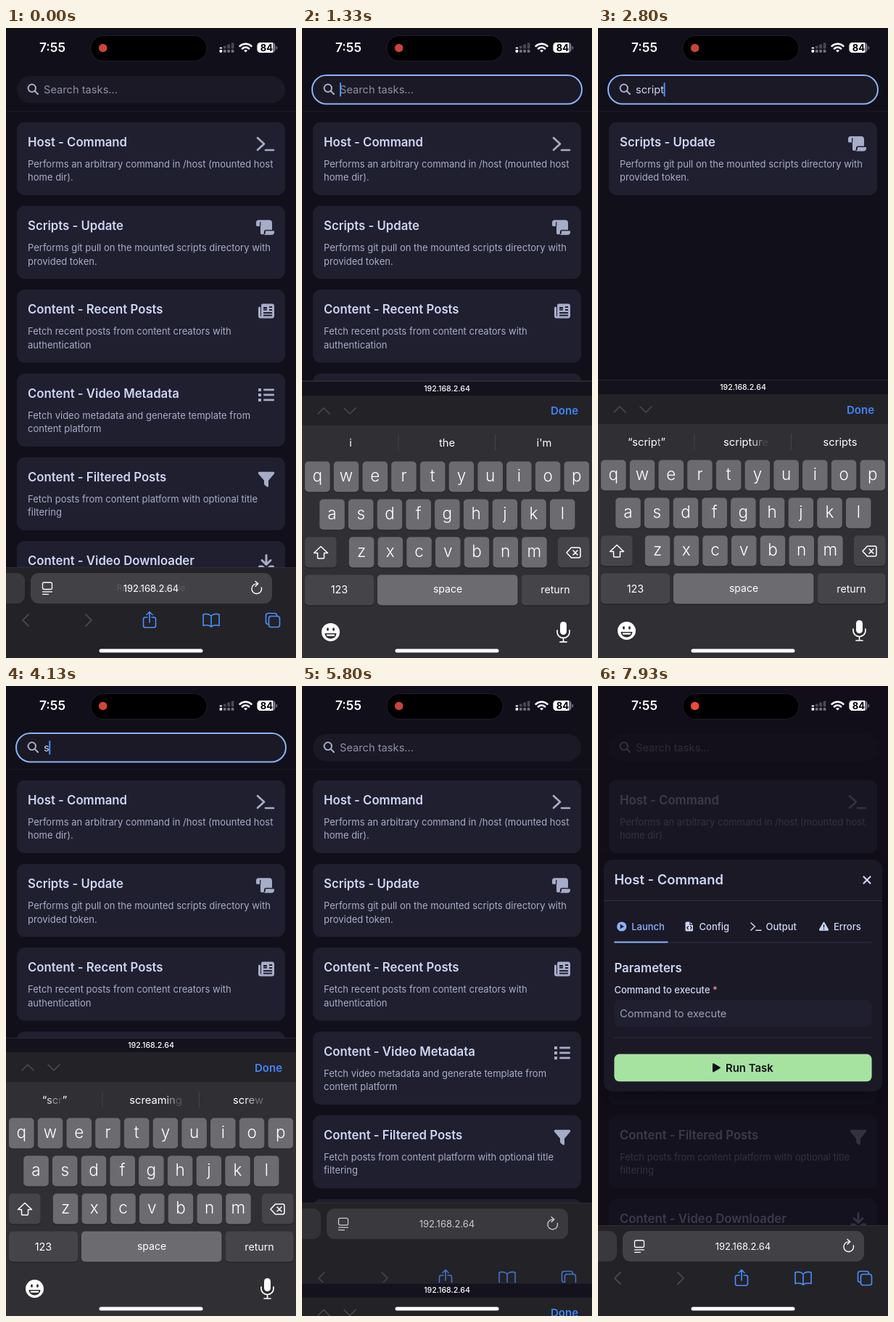
An HTML page for the animation above (8 s loop, 400 by 867 pixels).

```html
<!DOCTYPE html>
<html lang="en">
<head>
<meta charset="utf-8">
<title>Task search</title>
<style>
  html, body { margin: 0; width: 100%; height: 100%; overflow: hidden; background: #110f1a; }
  svg { display: block; width: 100vw; height: 100vh; font-family: Inter, "Noto Sans", sans-serif; }
  text { white-space: pre; }
  .line { fill: none; stroke: currentColor; stroke-linecap: round; stroke-linejoin: round; }
  .solid { fill: currentColor; }
  #modal { filter: drop-shadow(0 14px 12px rgba(0, 0, 0, .32)); }
</style>
</head>
<body>
<svg id="stage" viewBox="0 0 400 867"></svg>
<script>
const LOOP = 8000;
const BLUE = '#4a90fb', ACCENT = '#89b4fa', TEXT = '#cdd6f4', MUTED = '#a6adc8', PAGE = '#110f1a', CARD = '#201f2f';

const label = (x, y, size, fill, content, extra = '') =>
  `<text x="${x}" y="${y}" font-size="${size}" fill="${fill}" ${extra}>${content}</text>`;
const rect = (x, y, w, h, r, fill, extra = '') =>
  `<rect x="${x}" y="${y}" width="${w}" height="${h}" rx="${r}" fill="${fill}" ${extra}/>`;
const line = (d, width = 2, extra = '') => `<path class="line" stroke-width="${width}" d="${d}" ${extra}/>`;
const solid = d => `<path class="solid" d="${d}"/>`;
const group = (x, y, color, content, extra = '') =>
  `<g transform="translate(${x} ${y})" color="${color}" ${extra}>${content}</g>`;
const MIDDLE = 'text-anchor="middle"', BOLD = 'font-weight="600"', MEDIUM = 'font-weight="500"';

// Card icons share a 25 x 22 box.
const icons = {
  terminal: line('M2 3.2l9 8.3-9 8.3M13 20h11', 2.7),
  scroll: solid('M3.5 1H18a4 4 0 0 1 4 4v9.5H13.5a2.5 2.5 0 0 0-2.5 2.5v1.5a2.5 2.5 0 0 1-5 0V9.5H1.5A1.5 1.5 0 0 1 0 8V4.5A3.5 3.5 0 0 1 3.5 1z') +
    solid('M13 16h12v1.5a4 4 0 0 1-4 4H10.5c1.7-.8 2.5-2 2.5-3.5z') + line('M5.7 4v5', 1.3, `style="color:${CARD}"`),
  news: solid('M9 1h13a3 3 0 0 1 3 3v14a3 3 0 0 1-3 3H6a3 3 0 0 1-3-3V6.5a1.5 1.5 0 0 1 3 0V18h1V3a2 2 0 0 1 2-2z') +
    `<path fill="none" stroke="${CARD}" stroke-width="2" d="M10 6.5h5M10 9h5M18 5.5h4M18 9.5h4M10 13.5h12M10 17h12"/>`,
  list: solid('M3 2h4v4H3zM3 9h4v4H3zM3 16h4v4H3z') + line('M11.3 4h12.5M11.3 11h12.5M11.3 18h12.5', 2.6),
  filter: solid('M4 1.5h20q2 1 .7 3l-7.7 9v8q-.7 1.5-2 .7l-3.5-2.7q-.5-.6-.5-1.5v-4.5L3.300 4.500Q2 2.500 4 1.500z'),
  download: line('M14 1v12M8 8l6 6 6-6', 3) + solid('M5 15h4l5 4 5-4h4q2 0 2 2v3q0 2-2 2H5q-2 0-2-2v-3q0-2 2-2z')
};

const cards = [
  ['Host - Command', 'Performs an arbitrary command in /host (mounted host', 'home dir).', 'terminal'],
  ['Scripts - Update', 'Performs git pull on the mounted scripts directory with', 'provided token.', 'scroll'],
  ['Content - Recent Posts', 'Fetch recent posts from content creators with', 'authentication', 'news'],
  ['Content - Video Metadata', 'Fetch video metadata and generate template from', 'content platform', 'list'],
  ['Content - Filtered Posts', 'Fetch posts from content platform with optional title', 'filtering', 'filter'],
  ['Content - Video Downloader', '', '', 'download']
];
const cardTop = i => 129.5 + i * 115.3;
const card = ([title, first, second, icon], i) => group(0, cardTop(i), MUTED,
  rect(15, 0, 370, 100.5, 11, CARD) +
  (i ? '' : rect(15, 0, 370, 100.5, 11, '#35344a', 'id="hover"')) +
  label(30, 33.3, 16.75, TEXT, title, BOLD) +
  label(30, 62.3, 13.03, MUTED, first) + label(30, 80.8, 13.03, MUTED, second) +
  group(345, 18.5, MUTED, icons[icon]), 'class="card"');

const search = rect(15, 66, 370, 37.5, 18.7, '#1b1925') +
  rect(14, 65, 372, 39.5, 19.7, 'none', `id="ring" stroke="${ACCENT}" stroke-width="2"`) +
  group(37, 84, MUTED, '<circle class="line" cx="-1.2" cy="-1.2" r="5.2" stroke-width="2"/>' + line('M3 3l4 4', 2.2)) +
  label(52, 90, 14.66, '#8d90a8', 'Search tasks...', 'id="hint"') +
  label(52, 90, 14.66, TEXT, '', 'id="query"') +
  rect(0, 75, 2, 19.5, 1, BLUE, 'id="caret"') +
  rect(0, 114, 400, 1, 0, '#1a1924');

const tab = (x, color, name, icon) => group(x, 331, color, icon) + label(x + 13.5, 335.7, 13.03, color, name, MEDIUM);
const modal = rect(8, 239, 384, 319, 12, '#1b1926') +
  label(22.4, 273, 18.4, TEXT, 'Host - Command', BOLD) +
  group(371, 267, TEXT, line('M-4.5-4.5l9 9M4.5-4.5l-9 9', 2.2)) +
  rect(8, 295, 384, 1, 0, '#313143') +
  rect(22.4, 352.5, 355.2, 1, 0, '#313143') + rect(22.4, 351.5, 74, 2, 0, ACCENT) +
  tab(32.7, ACCENT, 'Launch', '<circle class="solid" r="6.6"/><path fill="#1b1926" d="M-2-3.3l5.2 3.3-5.2 3.3z"/>') +
  tab(126, TEXT, 'Config', solid('M-4-6.5h5l4 4v7.5q0 1.5-1.5 1.5h-7.5q-1.5 0-1.5-1.5v-10q0-1.5 1.5-1.5z') +
    '<path fill="none" stroke="#1b1926" stroke-width="1.2" d="M1-6.5v4h4M-1.3-.5l-2 2.3 2 2.3M1.3-.5l2 2.3-2 2.3"/>') +
  tab(218, TEXT, 'Output', line('M-7-5l5.5 5-5.5 5M0 5.3h7', 1.6)) +
  tab(311.5, TEXT, 'Errors', solid('M-1-5.5q1-1.3 2 0l5.5 9.5q.5 1.8-1.2 1.8h-10.6q-1.7 0-1.2-1.8z') +
    '<path stroke="#1b1926" stroke-width="1.5" d="M0-2.5v4M0 2.7v1.5"/>') +
  label(22.4, 394, 16.85, TEXT, 'Parameters', BOLD) +
  label(22.4, 423, 13.03, TEXT, 'Command to execute <tspan fill="#f38ba8">*</tspan>', MEDIUM) +
  rect(22.4, 431.7, 355.2, 37.3, 8, CARD) + label(30, 456, 14.66, '#9a9eb6', 'Command to execute') +
  rect(22.4, 483.5, 355.2, 1, 0, '#313143') +
  rect(22.4, 506.6, 355.2, 37.7, 7, '#a6e3a1') +
  group(163, 525.3, PAGE, solid('M-5-5q0-1.5 1.5-1l9 5.2q1 .8 0 1.6l-9 5.2q-1.5.5-1.5-1z')) +
  label(176, 530.7, 14.9, PAGE, 'Run Task', BOLD);

// The bar is tall enough to stay behind the keyboard while both rise.
const toolbar = '<g id="bar">' + rect(0, 742, 400, 385, 0, '#232227') + rect(0, 742, 400, .7, 0, '#34333a') +
  '<g class="controls">' + rect(-20, 750, 46, 42, 11, '#39383d') + rect(34, 750, 333, 42, 11, '#424146') +
  label(200, 775, 12, '#fff', 'Reader Available', MIDDLE + ' id="ghost"') +
  label(200, 775.5, 13, '#fff', '192.168.2.64', MIDDLE) +
  group(57, 771, '#fff', '<rect class="line" x="-6.5" y="-8" width="13" height="9.5" rx="2" stroke-width="1.3"/>' +
    line('M-6.5 4.800h13M-6.500 8.300h8', 1.3)) +
  group(346, 771, '#fff', line('M6.3-1a6.8 6.8 0 1 1-5.5-5M-2-9.5l3.8 3.3-3.8 3.5', 1.4)) + '</g></g>' +
  '<g class="controls">' +
  group(27, 815, '#47464b', line('M4-8l-8 8 8 8', 1.9)) + group(114, 815, '#47464b', line('M-4-8l8 8-8 8', 1.9)) +
  group(198, 815, BLUE, line('M-3-4h-3q-2.5 0-2.5 2.5v9q0 2.5 2.5 2.5h12q2.5 0 2.5-2.5v-9q0-2.5-2.5-2.5h-3M0 3v-14M-4-7.5l4-4 4 4', 1.6)) +
  group(283, 815, BLUE, line('M0-6q-4.5-4-11-2v15.5q6.5-2 11 1.5q4.5-3.5 11-1.5v-15.5q-6.5-2-11 2v15', 1.6)) +
  group(368, 815, BLUE, '<rect class="line" x="-5.5" y="-5.5" width="15" height="15" rx="3" stroke-width="1.6"/>' +
    line('M-5.5 5.5h-1q-3 0-3-3v-9q0-3 3-3h9q3 0 3 3v1', 1.6)) + '</g>';

// Keyboard
const PITCH = 39.72, KEY_W = 34.6, KEY_H = 42, KEY = '#6c6b70', DARK_KEY = '#454449';
const keys = {};
[['qwertyuiop', 4, 594.5], ['asdfghjkl', 24.2, 646.5], ['zxcvbnm', 64.8, 698.5]].forEach(([row, x, y]) =>
  [...row].forEach((letter, i) => keys[letter] = { x: x + i * PITCH, y }));
const keyRect = (x, y, w, fill, extra) => rect(x, y + 1, w, KEY_H, 5, '#1c1c1f') + rect(x, y, w, KEY_H, 5, fill, extra);
const letterKeys = Object.entries(keys).map(([letter, { x, y }]) => keyRect(x, y, KEY_W, KEY) +
  label(x + KEY_W / 2, y + 27.5, 22.5, '#fff', letter, MIDDLE + ' font-weight="300"')).join('');

const keyboard = rect(0, 484, 400, 21, 0, '#13121d') + rect(0, 484, 400, 1, 0, '#2a2935') +
  label(200, 498, 10.6, '#fff', '192.168.2.64', MIDDLE + ' ' + MEDIUM) +
  rect(0, 504, 400, 42, 0, '#232227') + rect(0, 545, 400, 330, 0, '#302f34') +
  group(30, 525, '#4b4a50', line('M-8 4l8-8 8 8', 1.6)) + group(66, 525, '#4b4a50', line('M-8-4l8 8 8-8', 1.6)) +
  label(343, 530.5, 15, '#3f86f7', 'Done', BOLD) +
  rect(132.5, 558, 1, 22, 0, DARK_KEY) + rect(266, 558, 1, 22, 0, DARK_KEY) +
  [67, 200, 334].map(x => label(x, 574.5, 14.7, '#fff', '', MIDDLE + ' class="suggestion"')).join('') +
  letterKeys +
  keyRect(4, 698.5, 43.6, DARK_KEY) + keyRect(353, 698.5, 43.6, DARK_KEY, 'id="erase"') +
  keyRect(4, 750.5, 95, DARK_KEY) + keyRect(104, 750.5, 193.5, KEY) + keyRect(302.5, 750.5, 94, DARK_KEY) +
  group(26, 720, '#fff', line('M0-8.5l9.5 9h-5v6.5q0 1-1 1h-7q-1 0-1-1v-6.5h-5z', 1.5)) +
  group(375, 720, '#fff', line('M-3.5-7h10q2.5 0 2.5 2.5v9q0 2.5-2.5 2.5h-10l-6.500-7zM-1-3l6 6M5-3l-6 6', 1.5)) +
  label(51.5, 776.5, 14.4, '#fff', '123', MIDDLE) + label(201, 775.5, 14, '#fff', 'space', MIDDLE) +
  label(349.5, 776.5, 14.2, '#fff', 'return', MIDDLE) +
  group(39.5, 829.5, '#fff', '<circle class="solid" r="12.5"/><g fill="#302f34"><ellipse cx="-4" cy="-4" rx="1.5" ry="2.2"/>' +
    '<ellipse cx="4" cy="-4" rx="1.5" ry="2.2"/><path d="M-8 1.5H8a8 7.5 0 0 1-16 0z"/></g><path class="solid" d="M-6 3H6l-1 2.2H-5z"/>') +
  group(360.5, 829, '#fff', rect(-4.5, -14, 9, 18, 4.5, 'currentColor') + line('M-8.5-2v2.5a8.5 8 0 0 0 17 0V-2M0 9v5M-4.5 14h9', 1.7)) +
  `<g id="pop">${rect(-6, -54, KEY_W + 12, 52, 9, '#77767b')}${rect(0, -8, KEY_W, KEY_H + 8, 5, '#77767b')}` +
  label(KEY_W / 2, -18, 34, '#fff', '', MIDDLE + ' font-weight="300"') + '</g>';

const bars = [0, 1, 2, 3].map(i =>
  rect(294.5 + i * 5.4, 30, 3.7, 3.8, 1, i < 1 ? '#fff' : '#77757e') +
  rect(294.5 + i * 5.4, 26.5 - i * 2, 3.7, 2 + i * 2, 1, i < 1 ? '#fff' : '#4b4953')).join('');
const status = label(64, 33, 17.3, '#fff', '7:55', MIDDLE + ' ' + BOLD) +
  rect(117, 10.5, 160, 35, 17.5, '#000', 'stroke="#1f1d29"') + '<circle id="dot" cx="133.7" cy="27.5" r="5.8"/>' + bars +
  group(330.5, 32.5, '#fff', line('M-8-7.5a11.5 11.5 0 0 1 16 0M-4.7-4a6.8 6.8 0 0 1 9.4 0', 2.5) + solid('M-2.5-1.5q2.5-2 5 0l-2.5 2.5z')) +
  rect(346.5, 20, 25, 14, 4.5, '#77757e') + '<path fill="#fff" d="M351 20h17v14h-17a4.5 4.5 0 0 1-4.5-4.5v-5a4.5 4.5 0 0 1 4.5-4.5z"/>' +
  rect(372.5, 25, 1.6, 4.5, .8, '#77757e') + label(359.5, 31.7, 13, '#000', '84', MIDDLE + ' font-weight="700"');

const stage = document.getElementById('stage');
stage.innerHTML = rect(0, 0, 400, 867, 0, PAGE) + cards.map(card).join('') + search +
  rect(0, 0, 400, 867, 0, PAGE, 'id="shade"') + `<g id="modal">${modal}</g>` +
  toolbar + `<g id="keyboard">${keyboard}</g>` + status + rect(128.5, 854.5, 143, 5, 2.5, '#fff');

const el = id => document.getElementById(id);
const set = (node, name, value) => node.setAttribute(name, value);
const cardNodes = [...stage.querySelectorAll('.card')];
const controls = [...stage.querySelectorAll('.controls')];
const slots = [...stage.querySelectorAll('.suggestion')];

// Timeline
const typed = [[1850, 's'], [2000, 'c'], [2150, 'r'], [2300, 'i'], [2450, 'p'], [2600, 't']];
const erased = [3380, 3550, 3720, 3900, 4050, 4230, 4400];
const suggestions = [
  { at: -500, words: ['i', 'the', "i'm"] },
  { at: 1900, words: ['“s”', 'so', 'see'] },
  { at: 2050, words: ['“sc”', 'school', 'screen'] },
  { at: 2200, words: ['“scr”', 'screen', 'screw'] },
  { at: 2350, words: ['“scri”', 'script', 'scripts'] },
  { at: 2500, words: ['“scrip”', 'script', 'scripts'] },
  { at: 2650, words: ['“script”', 'scripture', 'scripts'], shift: 4 },
  { at: 3440, words: ['“scrip”', 'script', 'scripts'] },
  { at: 3620, words: ['“scri”', 'script', 'scribe'] },
  { at: 3975, words: ['“scr”', 'screaming', 'screw'], shift: 6.5, delay: [90, 0, 65] },
  { at: 4180, words: ['“s”', 'so', 'see'] },
  { at: 4300, words: ['i', 'the', "i'm"] }
];
const SHOW_KEYS = 925, HIDE_KEYS = 5600, OPEN_MODAL = 6850;

const clamp = v => Math.max(0, Math.min(1, v));
const ramp = (t, start, length) => clamp((t - start) / length);
const spring = t => t < 0 ? 0 : 1 - (1 + t * .01826) * Math.exp(-t * .01826);

function drawSuggestions(t) {
  const index = suggestions.findLastIndex(s => t >= s.at);
  const { at, words, shift = 0, delay = [0, 0, 0] } = suggestions[index];
  const before = index ? suggestions[index - 1].words : words;
  slots.forEach((slot, n) => {
    const age = t - at - delay[n];
    slot.innerHTML = [...words[n]].map((c, i) => {
      const steady = words[n] === before[n] || c === '”';
      return `<tspan fill-opacity="${steady ? 1 : clamp((age - i * 18) / 60)}">${c}</tspan>`;
    }).join('');
    set(slot, 'dx', n === 1 ? shift * (1 - ramp(age, 160, 150)) : 0);
  });
}

function draw(t) {
  const count = typed.filter(([at]) => t >= at).length - erased.filter(at => t >= at).length;
  const query = 'script'.slice(0, Math.max(0, count));
  const raised = spring(t - SHOW_KEYS) - spring(t - HIDE_KEYS);
  const focus = ramp(t, SHOW_KEYS, 150) - ramp(t, HIDE_KEYS, 150);

  el('query').textContent = query;
  set(el('hint'), 'opacity', query ? 0 : 1);
  set(el('ring'), 'opacity', focus);
  set(el('caret'), 'opacity', focus);
  set(el('caret'), 'x', 52 + (query ? el('query').getComputedTextLength() - .5 : 0));

  const filtered = query.length > 1;
  cardNodes.forEach((node, i) => {
    set(node, 'display', filtered && i !== 1 ? 'none' : 'inline');
    set(node, 'transform', `translate(0 ${cardTop(filtered ? 0 : i)})`);
  });

  set(el('keyboard'), 'transform', `translate(0 ${383 * (1 - raised)})`);
  set(el('bar'), 'transform', `translate(0 ${-258 * raised})`);
  controls.forEach(node => set(node, 'opacity', clamp(1 - 2 * raised)));
  set(el('ghost'), 'opacity', .14 * (1 - ramp(t, 50, 250)));
  drawSuggestions(t);

  const pressed = typed.find(([at]) => t >= at - 20 && t < at + 70);
  set(el('pop'), 'display', pressed ? 'inline' : 'none');
  if (pressed) {
    const { x, y } = keys[pressed[1]];
    set(el('pop'), 'transform', `translate(${x} ${y})`);
    el('pop').querySelector('text').textContent = pressed[1];
  }
  set(el('erase'), 'fill', erased.some(at => t >= at && t < at + 70) ? KEY : DARK_KEY);

  const opened = 1 - (1 - ramp(t, OPEN_MODAL, 300)) ** 2;
  set(el('hover'), 'opacity', ramp(t, OPEN_MODAL, 200));
  set(el('shade'), 'opacity', .78 * ramp(t, OPEN_MODAL, 200));
  set(el('modal'), 'opacity', opened);
  set(el('modal'), 'display', opened ? 'inline' : 'none');
  set(el('modal'), 'transform', `translate(0 ${-20 * (1 - opened)})`);

  const glow = .5 + .5 * Math.cos(2 * Math.PI * (t / 1500 - .4));
  set(el('dot'), 'fill', `rgb(${200 + 42 * glow} ${68 + 6 * glow} ${54 + 6 * glow})`);
}

const origin = performance.now();
function frame() {
  draw((performance.now() - origin) % LOOP);
  requestAnimationFrame(frame);
}
frame();
</script>
</body>
</html>
```
